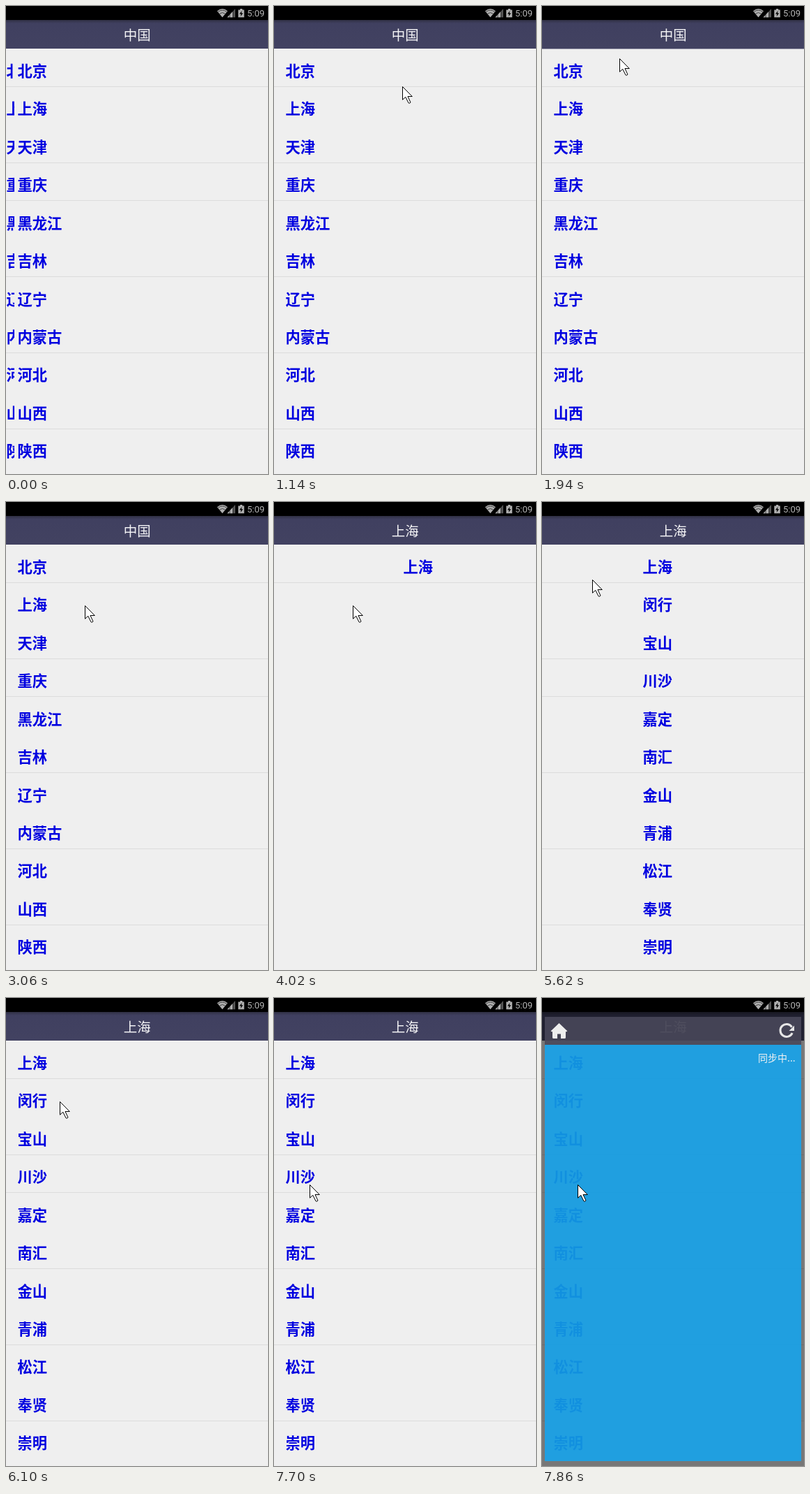
Animation, 376 px wide and 670 px high, one loop 8000 ms. Source, as an HTML page:

```html
<!DOCTYPE html>
<html lang="zh-CN">
<head>
<meta charset="utf-8">
<title>城市列表</title>
<style>
html, body { margin: 0; width: 100%; height: 100%; overflow: hidden; background: #efefef; }
svg { display: block; width: 376px; height: 670px; }
text { font-family: "Noto Sans CJK SC", "Noto Sans CJK JP", "Noto Sans CJK", sans-serif; }
.row { font-size: 21.3px; font-weight: 700; fill: #0000e0; }
.title { font-size: 19.5px; fill: #f4f4f6; text-anchor: middle; }
.clock { font: 13px Roboto, sans-serif; fill: #b4b4b4; }
</style>
</head>
<body>
<svg viewBox="0 0 376 670">
  <defs>
    <linearGradient id="shade" x2="0" y2="1">
      <stop offset="0" stop-color="#303044"/>
      <stop offset=".12" stop-color="#404060"/>
      <stop offset="1" stop-color="#424261"/>
    </linearGradient>
    <clipPath id="strip"><rect y="61" width="12" height="609"/></clipPath>
  </defs>
  <rect width="376" height="670" fill="#efefef"/>
  <g id="lines" fill="#dcdcdc"></g>
  <g clip-path="url(#strip)"><g id="ghost"></g></g>
  <g id="list"></g>
  <rect y="20" width="376" height="41" fill="url(#shade)"/>
  <rect id="edge" y="61" width="376" height="1" fill="#a9a9b8"/>
  <text id="title" class="title" x="188.3" y="48.6"></text>

  <rect width="376" height="20"/>
  <g fill="#b0b0b0">
    <path d="M303 7.2Q310.5 .8 318 7.2L310.5 16.2Z"/>
    <path d="M304.3 8.3Q310.5 3.6 316.7 8.3M306.6 11Q310.5 8 314.4 11" fill="none" stroke="#222" stroke-width=".8"/>
    <path d="M317.5 16.2L329 4V16.2Z" fill="#555"/>
    <path d="M317.5 16.2L325.5 7.8V16.2Z"/>
    <path d="M321 11V17M325.7 6V17" stroke="#000" stroke-width=".6"/>
    <path d="M333.3 5.5H336V4H339.2V5.5H341.8V16.2H333.3Z"/>
    <path d="M338.6 6.8L335 11.6H337.3L336.6 15L340.2 10.2H337.9Z" fill="#000"/>
  </g>
  <text class="clock" x="346" y="15.2">5:09</text>

  <g id="panel">
    <rect y="20" width="376" height="650" opacity=".5"/>
    <rect x="4" y="27" width="368" height="40" fill="#49485a" opacity=".88"/>
    <rect x="4" y="67" width="368" height="596" fill="#14a6f0" opacity=".87"/>
    <path d="M24.5 36L36.3 47.2Q36 48.6 34 48.3V56.5Q34 58 32.5 58H27V51.5H22V58H16.5Q15 58 15 56.5V48.3Q13 48.6 12.7 47.2Z" fill="#eee"/>
    <path d="M359.2 50.2A9 9 0 1 1 358.6 41.6" fill="none" stroke="#e6e6e6" stroke-width="3"/>
    <path d="M362 39.5V47H354.5Z" fill="#e6e6e6"/>
    <text x="310" y="91" font-size="14" fill="#f2f2f2">同步中...</text>
  </g>
  <path id="cursor" d="M.5 .5V19.2L4.8 15.3L9 23.8Q10.8 25 12 23L8 14.5H14.3Z" fill="#fff" stroke="#000"/>
</svg>
<script>
const LOOP = 8000, STEP = 160, START = 500, PITCH = 54.42;
const provinces = '北京 上海 天津 重庆 黑龙江 吉林 辽宁 内蒙古 河北 山西 陕西'.split(' ');
const districts = '上海 闵行 宝山 川沙 嘉定 南汇 金山 青浦 松江 奉贤 崇明'.split(' ');
const ruled = [0, 2, 3, 5, 7, 9];

// from: when the screen appears, slide: when its rows start to enter
const screens = [
  { from: 0, slide: -2000, title: '中国', rows: provinces },
  { from: 3380, slide: 3488, title: '上海', rows: ['上海'] },
  { from: 5140, slide: 5016, title: '上海', rows: districts }
];

// time, x, y
const path = [
  [500, 208, 129], [820, 208, 129], [1300, 172, 108], [1940, 111, 75],
  [2420, 116, 130], [2740, 116, 200], [3060, 113, 148],
  [4020, 113, 148], [4660, 69, 94], [5300, 69, 94],
  [5780, 74, 120], [6100, 77, 148], [6420, 72, 100],
  [6740, 62, 210], [7060, 54, 314], [7220, 53, 300],
  [7540, 51, 267], [8000, 51, 267]
];

const $ = id => document.getElementById(id);
const show = (id, on) => $(id).setAttribute('visibility', on ? 'visible' : 'hidden');
const move = (id, x, y) => $(id).setAttribute('transform', `translate(${x} ${y})`);
const clamp = v => Math.min(1, Math.max(0, v));
const ease = v => (1 - Math.cos(Math.PI * clamp(v))) / 2;

const rowsMarkup = rows => rows.map((name, i) =>
  `<text class="row" x="16.5" y="${101 + i * PITCH}">${name}</text>`).join('');

function cursorAt(t) {
  const i = Math.max(1, path.findIndex(p => p[0] > t));
  const [t0, x0, y0] = path[i - 1], [t1, x1, y1] = path[i];
  const k = clamp((t - t0) / (t1 - t0));
  return [Math.round(x0 + (x1 - x0) * k), Math.round(y0 + (y1 - y0) * k)];
}

let current;
function setScreen(s) {
  if (s === current) return;
  current = s;
  $('title').textContent = s.title;
  $('list').innerHTML = rowsMarkup(s.rows);
  $('lines').innerHTML = ruled.filter(i => i < s.rows.length).map(i =>
    `<rect y="${Math.round(115 + i * PITCH)}" width="376" height="1"/>`).join('');
}

function draw(now) {
  const time = now % LOOP;
  // the picture advances in fixed ticks after the opening hold
  const t = time < START ? 0 : START + Math.floor((time - START) / STEP) * STEP;
  const s = screens.filter(v => v.from <= t).pop();
  setScreen(s);
  move('list', Math.round(376 * (1 - ease((t - s.slide) / 1000))), 0);
  move('cursor', ...cursorAt(t));
  show('cursor', t >= START);
  show('ghost', t < 980);
  show('edge', t >= 1460 && t < 2260);
  show('panel', t >= 7860);
}

$('ghost').innerHTML = rowsMarkup(provinces);
move('ghost', -16, 0);
const begin = performance.now();
function tick() {
  draw(performance.now() - begin);
  requestAnimationFrame(tick);
}
tick();
</script>
</body>
</html>
```
